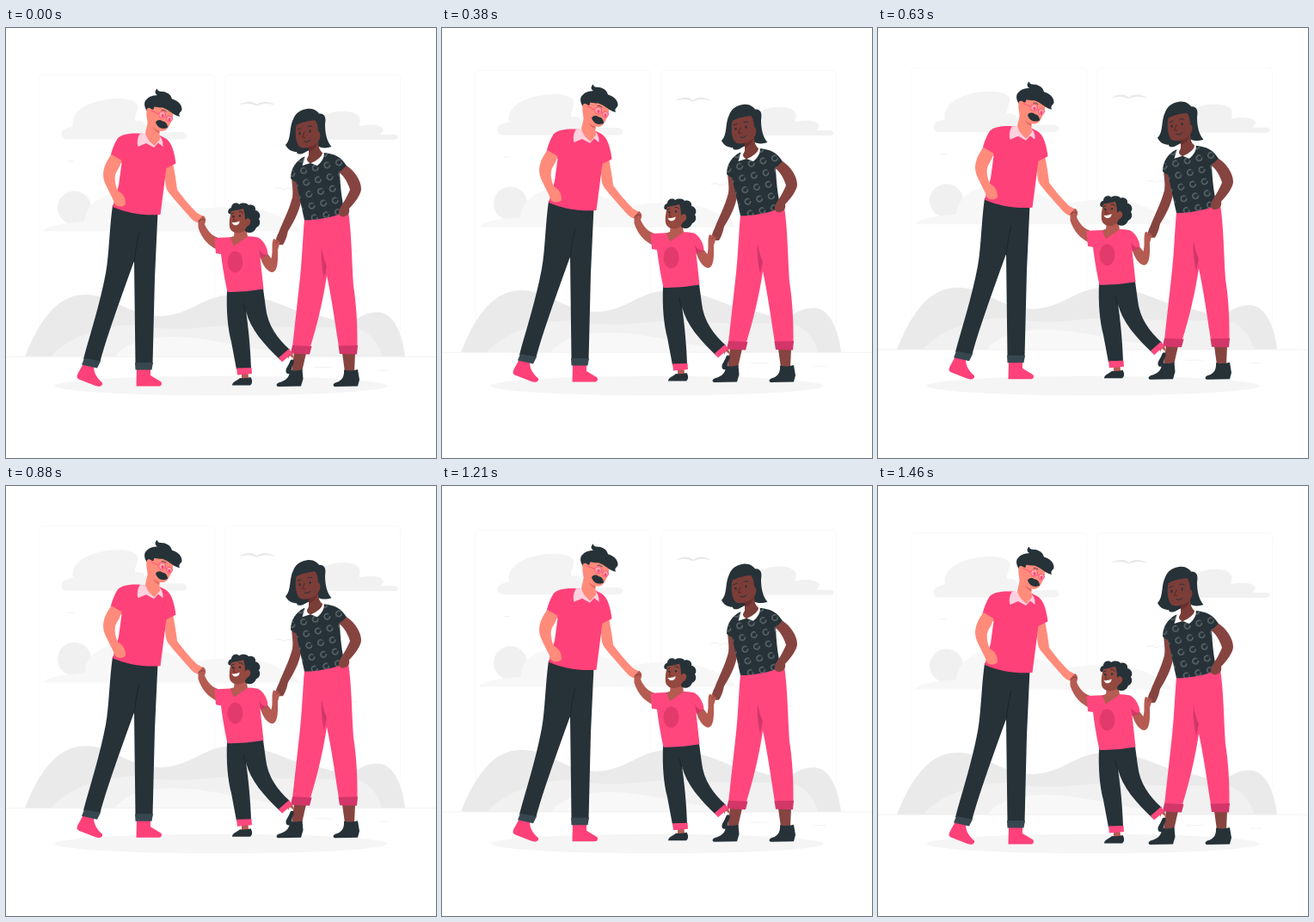
An HTML page for the animation above (1.5 s loop, 500 px wide and 500 px high).

```html
<!DOCTYPE html>
<html lang="en">
<head>
<meta charset="utf-8">
<title>Family</title>
<style>
html, body { margin: 0; width: 100%; height: 100%; overflow: hidden; background: #fff }
svg { display: block; width: 100%; height: 100% }
.dark { fill: #263238 }
.cuff { fill: #37474f }
.pink { fill: #ff4179 }
.rose { fill: #ff477e }
.deep { fill: #d33669 }
.man { fill: #ff8b7b }
.boy { fill: #b55b52 }
.boyface { fill: #94493f }
.mom { fill: #864440 }
.momface { fill: #7b3d38 }
.line { fill: none; stroke-linecap: round; stroke-linejoin: round }
</style>
</head>
<body>
<svg viewBox="0 0 500 500">
<defs>
  <pattern id="rings" x="359" y="183" width="14" height="14" patternUnits="userSpaceOnUse" patternTransform="rotate(-13 366 190)">
    <circle cx="7" cy="7" r="3.3" fill="none" stroke="#8f999d" stroke-width=".8" stroke-dasharray="18 3"/>
  </pattern>
  <path id="blouse" d="M346 150C338 154 331 163 331 175L337.500 180L347 223.500C365 223 381 220 394 214C390 198 389 185 388 169L396.500 161C390 150 382 146 369 145Z"/>
</defs>
<ellipse cx="250" cy="416" rx="193.500" ry="11.300" fill="#f5f5f5"/>
<g id="scene">
  <!-- backdrop -->
  <g class="line" stroke="#f9f9f9">
    <rect x="39" y="54.500" width="203.500" height="300" rx="4"/>
    <rect x="255" y="54.500" width="203.500" height="300" rx="4"/>
  </g>
  <path fill="#f3f3f3" d="M70 129.500C63 128 62 119 71 116.500Q75 115 78 114C75 99 90 90 105 85.500C125 80 150 81 153 90C154 97 149 103 150 108C160 107 163 111 164 121H205C212 122 212 129 206 129.500Z"/>
  <path fill="#f1f1f1" d="M340 130C350 110 360 104 371 101C384 95 407 95 411 104C413 109 410 112 411 114C422 111 438 112 439 119Q437 122 435 124H452C457 125 457 129 452 130Z"/>
  <path fill="#e8e8e8" d="M271 89.500Q284 82.500 291.500 89Q301 82.500 313 89.500Q300 86 291.500 90.500Q284 86 271 89.500Z"/>
  <path class="line" stroke="#f0f0f0" d="M313 187Q318 184 323 188Q328 185 334 187M72 155H79"/>
  <circle cx="79.500" cy="209" r="19.500" fill="#f0f0f0"/>
  <path fill="#f7f7f7" d="M43 236.500C48 230 65 227 92 225C90 209 108 195 125 193C160 189 195 202 212 214C240 206 290 206 310 216C325 222 338 228 342 236.500Z"/>
  <path fill="#eaeaea" d="M22 382C35 350 55 310 92 310C125 310 140 334 180 335C215 334 230 310 265 310C300 310 320 323 345 331C370 334 385 342 400 345C412 334 420 330.500 433 330.500C452 331 462 360 464 382Z"/>
  <path fill="#f1f1f1" d="M52 382C70 362 105 346 150 345C180 351 205 350 220 349C250 346 270 344 300 346C330 350 370 347 408 349C425 354 436 372 437 382Z"/>
  <path fill="#f8f8f8" d="M127 382C138 366 165 359 195 359C230 360 255 366 285 372C300 374 315 377 330 382Z"/>
  <path class="line" stroke="#efefef" stroke-width=".8" d="M0 382.300H500M433 398H446M358 394.500H378M404 259H408"/>

  <!-- father -->
  <path class="pink" d="M90 390L83.500 402C81.500 406 83 408 86 409L104 416C109 418 113 416 112 412.500C106 407 102 402 102 393ZM152 395L151.500 416.500H178C182 416 182 411.500 178 410L168 404V395Z"/>
  <path class="dark" d="M124 206C120 235 120 262 116 285C109 322 98 355 90 385L109.500 388C117 360 133 315 149 271L150.500 391H170.500L173 290L176.500 214Z"/>
  <path class="cuff" d="M91 384L110 387.500L106 395.500L88 391.500ZM150 389H171L169.500 397.500H150.500Z"/>
  <path class="line" stroke="#1b2428" d="M154.500 239Q151 254 149 272"/>
  <path class="man" d="M186 158C185 175 184 184 189 191C197 201 207 212 214 220C218 225 222 226 225 227C229 229 233 226 232 221Q228 218 222 215C214 207 204 195 199 188C198 178 196 168 194 156Z"/>
  <path class="pink" d="M156 122.500C145 122 135 123 130 128C126 134 123 142 121.500 149L134.500 157L131 183L124 208C140 215 160 218.500 179.500 217L186.500 163L197.500 157.500C196 146 193 132 185 128L179 125Z"/>
  <path class="man" d="M122.500 147C113 160 111 170 115 180C120 191 125 199 126.500 205C130 209 139 208 139 204C139 196 135 192 130 189C126 180 126 172 128 168Q133 160 134.500 154Z"/>
  <path fill="#ffd0de" d="M156 122.500C153 127 152 133 153.500 138L163 134L172 139L177 133.500L182.500 138C183 132 181 128 178 125Z"/>
  <path class="man" d="M164 92C162 101 165 107 164.500 111L162 122C164 130 169 134 172.500 137L179 129.500L178 119.500C184 121 188 118 190 113C194 106 195 101 193.500 96L180 86Z"/>
  <path fill="#e5675f" d="M171 115Q174 119 178.500 119.500V122.500Q172 120 171 115Z"/>
  <path class="dark" d="M164.500 97C160 92 160 85 164 82.500C167 79 171 78.500 176 78C172.500 76 173 72.500 176 70.500C176 75 181 73 185 74.500C190 76 192 79 193 82.500C199 84 205 89 204.500 95C204 98 200 98 202 103C195 102 190 95 182 92.500C178 93 175 91 172 92C172 96 170 95 168 93.500C164 92 163 95 164.500 97Z"/>
  <g class="line" stroke="#ff4179" stroke-width=".8">
    <circle cx="181.500" cy="101" r="3.900" fill="#ffa9a8"/>
    <circle cx="190" cy="105.500" r="3.400" fill="#ffa9a8"/>
    <path d="M177.500 100L169 96M185.500 103L187 104"/>
    <path stroke="#263238" d="M181 95.500Q183 94.500 186 97"/>
  </g>
  <ellipse class="pink" cx="182" cy="102" rx="1.500" ry="2"/>
  <ellipse class="pink" cx="190" cy="106.500" rx="1.300" ry="1.900"/>
  <path class="dark" d="M174 109.500C176 106 180 106.500 182.500 108.500C186 109 188 112 188 115.500C184 118.500 176 117 174 109.500Z"/>

  <!-- mother -->
  <path class="mom" d="M335 378H349L344 400H332ZM391 378H406L405 400H394Z"/>
  <path class="dark" d="M330 397.500Q337 399.500 344.500 397L345.500 408L343 416.500L316 417C313 415 315 412.500 320 411.500C326 409 330 406 330 397.500ZM393 397.500Q401 399.500 409 397L411 409L409 416.500L382 417C379 415 381 412.500 386 411.500C391 409 393.500 405 393 397.500Z"/>
  <path class="rose" d="M347 222C345 245 344 275 341 299L333 371L353.500 372C362 345 369 315 373 288C378 310 383 345 387 371L408.500 371C409 345 407 318 404 300C402 270 402 240 398 213Z"/>
  <path class="deep" d="M367 256C366 270 368 282 370 291L373 277Q369 268 367 256ZM333 369L355.500 370L353 379.500L331 378.500ZM386.500 369.500L409 369L408 379.500L388 379Z"/>
  <path class="mom" d="M332 174C333 185 334 190 333 197C329 212 322 225 317 238C314 243 313 249 314 252L322 252C326 246 327 240 328 236C337 222 343 208 344 195L340 175Z"/>
  <use href="#blouse" fill="#263238"/>
  <use href="#blouse" fill="url(#rings)"/>
  <path class="mom" d="M387.500 168C394 173 398 181 400 188C397 196 391 205 388 210C385 216 388 219.500 392 219.500C398 219 400 214 399 210C406 203 413 193 413 187C413 177 405 166 396 160Z"/>
  <path fill="#fff" d="M348 148L344.500 160L354 157L362 160C367 156 371 150 369.500 144.500Z"/>
  <path class="dark" d="M350 94C358 93 362 97 364 99.500C372 99 372 106 371 112C371 122 373 132 378.500 138C373 140 366 140 362 137L345 146C340 147.500 338 146 338 144C333 144 328 142 325 136C332 130 329 115 334 106C337 98 343 95 350 94Z"/>
  <path class="momface" d="M352 132L352 148C350 152 348 154 354 157.500C362 154 368 149 368 145Q363 141 363 132Z"/>
  <path class="momface" d="M337.500 113C336 120 336 134 342 138.500C349 141 357 138 361 134C366 130 367 122 363 120C363 116 362 110 359 107C352 108 345 109 337.500 113Z"/>
  <path fill="#6b2f2d" d="M352 138Q358 138 362 133Q361 141 352 144Z"/>
  <g class="line" stroke="#263238">
    <path d="M339 118L343 116.500M351 114.500Q354 113 356 114.500M347 132Q351 133.500 354 130.500"/>
    <path stroke="#592522" d="M347 121L344.500 127L347.500 127.500"/>
  </g>
  <ellipse class="dark" cx="341.500" cy="122.500" rx="1.100" ry="1.700"/>
  <ellipse class="dark" cx="353.500" cy="120" rx="1.100" ry="1.700"/>

  <!-- son -->
  <path class="boy" d="M274 400H281.500L282 408H274ZM327 380L332 376L335 384L329 388Z"/>
  <path fill="#fff" d="M327 387L330 381L334 384L331 389Z"/>
  <path class="dark" d="M272 407C268 410.500 263 411.500 263 415.500H284C287 413 286.500 409 284.500 406Q278 408 272 407ZM331 386C335 384 336 388 333 393L331 401C328 404 324 401 326 396Q329 391 331 386Z"/>
  <path class="dark" d="M257 305C256 330 258 350 262 365L268 397L285 396C284 370 282 350 279 329C284 350 300 368 319 386L330 374C316 362 304 345 302 325L299 303Z"/>
  <path class="line" stroke="#1b2428" d="M276 320Q277 326 279 332"/>
  <path class="rose" d="M268 395.500L285.500 395L286 402L269 403.500ZM317 383.500L329 373L333 378L321 388.500Z"/>
  <path class="boy" d="M223.500 224L223.500 232C228 246 236 253 245 257.500L247 244C240 242 234 236 231 228C233 224 232 220 229 218Z"/>
  <path class="boy" d="M295 264C298 276 304 284 310 284C317 282 316 268 316 258L319 248L311 245C308 252 311 258 308.500 268L303 261Z"/>
  <path class="rose" d="M242.500 244.500C252 243 260 243.500 266 243C276 242 286 242 293 243.500C300 247 304 256 304.500 262L295.500 267L299.500 303.500C285 306 270 307 257.500 307C255 295 252 280 250 263L244 262Z"/>
  <path class="deep" d="M294 257L296 268L304 264Q297 264 294 257Z"/>
  <ellipse cx="266.500" cy="272" rx="9" ry="12.500" fill="#e33a6c"/>
  <path class="boy" d="M260.500 243.500L265 253.500L281 242.500L279 231L266 234L265 242Z"/>
  <path class="dark" d="M262 216C257 218 257 210 262 209C262 204 268 202 271 205C276 202 281 204 282 206C288 204 291 209 290 212C295 213 297 219 294 222C297 227 294 231 291 232C289 238 282 240 278 236L274 222Z"/>
  <path class="boyface" d="M262 213C260 220 259 228 260.500 233C263 239 272 240 277 236L280 231C285 229 286 222 281 221L278 223C278 217 277 213 276 210Q269 212 262 213Z"/>
  <path fill="#fff" d="M262.500 226Q267 227 271.500 224.500C272 229 265 232 262.500 226Z"/>
  <g class="line" stroke="#263238">
    <path d="M262 216.500L265 215M271 213.500Q273.500 212.500 275.500 215"/>
    <path stroke="#6b2f2d" d="M266 219L264 223.500L267 224"/>
  </g>
  <circle class="dark" cx="264" cy="219" r="1.200"/>
  <circle class="dark" cx="272" cy="218.500" r="1.200"/>

  <!-- clasped fingers -->
  <path class="line" stroke="#7b3d38" stroke-width=".8" d="M224 225Q227 221 231 223M314 250Q317 246 320 249"/>
</g>
</svg>
<script>
const LOOP = 1500, STEPS = 36, RISE = 10;
const scene = document.getElementById('scene');

// Linear rise and fall, stepped at 24 poses per second
function draw(now) {
  const step = Math.floor(now % LOOP / LOOP * STEPS + 0.05) % STEPS;
  const u = (step + 0.5) / STEPS;
  const lift = 2 * RISE * Math.min(u, 1 - u);
  scene.setAttribute('transform', `translate(0 ${0.28 - lift})`);
  requestAnimationFrame(draw);
}
draw(performance.now());
</script>
</body>
</html>
```
